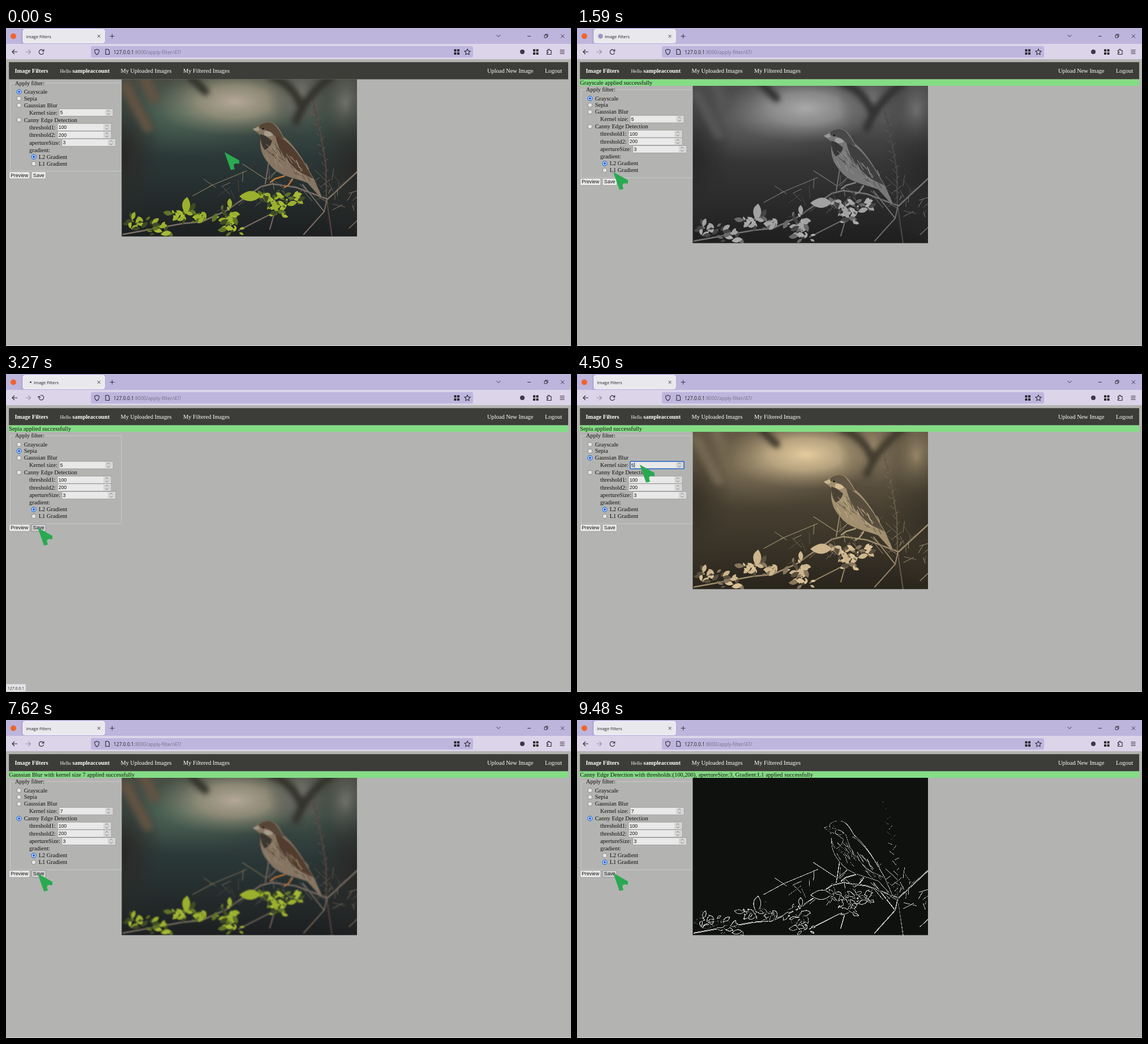
An HTML page for the animation above (9.75 s loop, 998x561 px).

```html
<!DOCTYPE html>
<html lang="en">
<head>
<meta charset="utf-8">
<title>Image Filters</title>
<style>
html, body { margin: 0; width: 100%; height: 100%; overflow: hidden; background: #b3b4b1 }
svg { display: block; width: 100vw; height: 100vh }
text { font: 10.4px "Liberation Serif", "Times New Roman", serif; fill: #111 }
.nav text { fill: #fff }
.bold { font-weight: bold }
.small { font-size: 8.65px }
.ui { font: 7.4px "Open Sans", sans-serif; fill: #222 }
.url { font-size: 8.5px }
.tiny { font-size: 6.9px }
.field { font: 8.7px "Liberation Sans", Arial, sans-serif }
.icons { fill: none; stroke: #2b2a33; stroke-width: 1.1; stroke-linejoin: round }
.box { fill: #e8e9e8; stroke: #8d8e8c; stroke-width: .7 }
.box.hover { fill: #cfcfd1; stroke: #77777c }
.box.focus { stroke: #2462c9; stroke-width: 1.6 }
.spin { fill: none; stroke: #666; stroke-width: .8 }
.radio circle:first-child { fill: #e6e6e6; stroke: #77777c; stroke-width: .8 }
.radio circle:last-child { fill: none }
.radio.on circle:first-child { fill: #fff; stroke: #1a62d6; stroke-width: 1.2 }
.radio.on circle:last-child { fill: #1a62d6 }
.twig { fill: none; stroke-linecap: round; stroke-linejoin: round }
</style>
</head>
<body>
<svg viewBox="0 0 998 561" preserveAspectRatio="none">
  <defs>
    <linearGradient id="dusk" x2="0" y2="1">
      <stop stop-color="#4a4a40"/><stop offset=".25" stop-color="#404f47"/>
      <stop offset=".5" stop-color="#2b3838"/><stop offset="1" stop-color="#1c1d1e"/>
    </linearGradient>
    <radialGradient id="glow"><stop stop-color="#b5a898"/><stop offset=".45" stop-color="#98917d" stop-opacity=".85"/><stop offset="1" stop-color="#68705c" stop-opacity="0"/></radialGradient>
    <radialGradient id="moss"><stop stop-color="#5c7764" stop-opacity=".8"/><stop offset="1" stop-color="#40574d" stop-opacity="0"/></radialGradient>
    <radialGradient id="shade"><stop stop-color="#282724"/><stop offset="1" stop-color="#2d2d2a" stop-opacity="0"/></radialGradient>
    <radialGradient id="haze"><stop stop-color="#74746c"/><stop offset="1" stop-color="#50524d" stop-opacity="0"/></radialGradient>
    <filter id="soft" x="-50%" y="-50%" width="200%" height="200%"><feGaussianBlur stdDeviation="5"/></filter>
    <filter id="edge" filterUnits="userSpaceOnUse" x="200" y="86" width="424" height="286" color-interpolation-filters="sRGB">
      <feColorMatrix type="saturate" values="0"/>
      <feConvolveMatrix order="3" kernelMatrix="-1 -1 -1 -1 8 -1 -1 -1 -1" preserveAlpha="true"/>
      <feComponentTransfer>
        <feFuncR type="table" tableValues=".06 .06 .8 .8 .8"/>
        <feFuncG type="table" tableValues=".07 .07 .8 .8 .8"/>
        <feFuncB type="table" tableValues=".06 .06 .8 .8 .8"/>
      </feComponentTransfer>
    </filter>
    <clipPath id="frame"><path d="M204.4 90.4H620V367.7H204.4z"/></clipPath>
    <path id="tiles" fill="#222" d="M0 0h4v4h-4zM5.5 0h4v4h-4zM0 5.5h4v4h-4zM5.5 5.5h4v4h-4z"/>
  </defs>

  <path fill="#bdb5dc" d="M0 0H998V28H0z"/>
  <path fill="#dcd4e9" d="M0 28H998V55H0z"/>
  <path stroke="#aaa3c6" d="M27.5 0V28"/>
  <circle cx="13" cy="14.5" r="5" fill="#f0642c"/>
  <rect x="30.5" y="2.5" width="143.5" height="23.5" rx="3" fill="#e9e8ec" stroke="#fff"/>
  <rect x="150" y="32" width="675" height="20" rx="3" fill="#beb6dd"/>
  <circle id="dot" cy="14.5" r="1.4" fill="#38383d"/>
  <circle id="burst" cx="41.5" cy="14.5" r="4.3" fill="#9b95c1"/>
  <text id="title" class="ui" y="17.5"></text>
  <g class="icons">
    <path stroke-width=".9" d="M161.5 12l5 5m0-5l-5 5M183.5 14.5h8m-4-4v8M866.5 12l3.5 3.5 3.5-3.5M921 14.5h6M980 11.5l6 6m0-6l-6 6M951 12.5h4.5v4.5h-4.5zm1.5 0v-1.500h4.500v4.500h-1.500"/>
    <path d="M20 42h-9m4-4l-4 4 4 4"/>
    <path stroke="#9a93ab" d="M34.5 42h9m-4-4l4 4-4 4"/>
    <path id="reload" d="M66 40A4.2 4.2 0 1 0 66.5 43.5m.3-6v3.5h-3.5"/>
    <path d="M160.5 37.5l4 1.500c0 4-1 6.500-4 8c-3-1.500-4-4-4-8zM176 37.5h4l2.500 2.500v6.500h-6.500z"/>
    <path d="M815 37l1.500 3.400 3.700.4-2.800 2.500.8 3.700-3.200-1.900-3.200 1.900.8-3.700-2.800-2.500 3.700-.4z"/>
    <path d="M955.5 39.5h2v-2h2.500v2h3v7h-7.500v-2.500h2v-2h-2zM978.5 39h8m-8 3h8m-8 3h8"/>
  </g>
  <use href="#tiles" x="791.5" y="37.5"/>
  <use href="#tiles" x="931" y="37.500"/>
  <circle cx="912" cy="42" r="4" fill="#3b3945"/>
  <text class="ui url" x="190" y="45.5">127.0.0.1<tspan fill="#77718c">:8000/apply-filter/47/</tspan></text>

  <path fill="#b3b4b1" d="M0 55H998V561H0z"/>
  <path fill="#d4d4d3" d="M0 560H998V561H0z"/>
  <path fill="#3c3c39" d="M5.2 60.2H993V90.4H5.2z"/>
  <g class="nav">
    <text class="bold" x="15.5" y="79">Image Filters</text>
    <text class="small" x="95.6" y="79">Hello</text>
    <text class="bold" x="117.3" y="79">sampleaccount</text>
    <text x="202.5" y="79">My Uploaded Images</text>
    <text x="313" y="79">My Filtered Images</text>
    <text x="850" y="79">Upload New Image</text>
    <text x="952" y="79">Logout</text>
  </g>
  <g id="note">
    <path fill="#84dc84" d="M5.2 90.4H993V102.1H5.2z"/>
    <text id="message" x="5.2" y="100.3"></text>
  </g>
  <g id="page">
    <path fill="none" stroke="#c9cac8" d="M15 97H7.5V252.5H204V97H70"/>
    <text x="16" y="100.5">Apply filter:</text>
    <g id="form"></g>
    <g id="photo" clip-path="url(#frame)"><g id="scene">
      <path fill="url(#dusk)" d="M190 80H634V378H190z"/>
      <ellipse cx="330" cy="150" rx="170" ry="75" fill="url(#moss)"/>
      <ellipse cx="404" cy="130" rx="145" ry="62" fill="url(#glow)"/>
      <ellipse cx="520" cy="115" rx="60" ry="75" fill="url(#haze)"/>
      <ellipse cx="600" cy="135" rx="40" ry="70" fill="url(#haze)"/>
      <ellipse cx="622" cy="250" rx="85" ry="130" fill="url(#shade)"/>
      <ellipse cx="205" cy="220" rx="70" ry="130" fill="url(#shade)"/>
      <g class="twig" filter="url(#soft)">
        <path stroke="#625342" stroke-width="18" d="M212 105L250 175M245 90L262 125"/>
        <path stroke="#30302b" stroke-width="14" d="M325 85L352 112M468 85Q505 98 520 135M575 85Q530 120 512 165"/>
      </g>
      <g id="plants"></g>
      <path fill="#857562" d="M436 179C446 174 449 166 462 166C478 166 484 180 490 191C506 204 520 224 530 242L544 266L558 298L552 295L532 273C505 263 480 261 465 240C450 225 447 205 450 192C447 185 441 183 436 179z"/>
      <path fill="#574636" d="M446 174C452 165 470 163 477 174C484 182 486 188 492 195L478 193C470 186 465 180 446 177z"/>
      <path fill="#a89c8a" d="M456 183Q464 179 472 188Q466 194 456 190z"/>
      <path fill="#3b362f" d="M449 187L458 190L470 199Q467 211 457 215Q449 205 449 187z"/>
      <path fill="#513c2e" d="M476 191C494 193 514 218 527 240L543 266L520 255C499 240 481 216 476 191z"/>
      <g id="plumage"></g>
      <path fill="#a09684" d="M436 178L447 174L448 181L441 182z"/>
      <circle cx="454" cy="178" r="1.7" fill="#171513"/>
      <path class="twig" stroke="#c27634" stroke-width="2.5" d="M492 261L475 266L467 272M506 267L498 278L492 281"/>
    </g></g>
  </g>
  <g id="status">
    <path fill="#e4e3e7" stroke="#bbb" stroke-width=".7" d="M0 547H35V560H0z"/>
    <text class="ui tiny" x="2.8" y="557">127.0.0.1</text>
  </g>
  <path id="cursor" fill="#2aa952" d="M0 0L26 14.5V20.5L19 20L16.5 22V25L18 30L11 31.5z"/>
</svg>
<script>
const $ = id => document.getElementById(id);
const LOOP = 9750, NOTE_HEIGHT = 11.7;

// Form
const label = (x, y, text) => `<text x="${x}" y="${y + 3.5}">${text}</text>`;
const radio = (id, x, y, text) => `<g id="${id}" class="radio"><circle cx="${x}" cy="${y}" r="3.9"/>
  <circle cx="${x}" cy="${y}" r="2.2"/></g>` + label(x + 8.7, y, text);
const number = (id, x, y, text, value) => label(41, y, text) +
  `<rect id="${id}Box" class="box" x="${x}" y="${y - 6.5}" width="95" height="13" rx="1"/>
  <path fill="#d5d6d5" d="M${x + 81} ${y - 5.5}h13v11h-13z"/>
  <path class="spin" d="M${x + 84.5} ${y - 1.5}l2.5-2.5 2.5 2.5m0 3l-2.5 2.5-2.5-2.5"/>
  <text id="${id}" class="field" x="${x + 1.7}" y="${y + 3.2}">${value}</text>`;
const button = (id, x, w, text) => `<rect id="${id}" class="box" x="${x}" y="253.5" width="${w}" height="12.5" rx="2"/>
  <text class="field" x="${x + w / 2}" y="262.8" text-anchor="middle">${text}</text>`;

$('form').innerHTML =
  radio('mode0', 23, 112.5, 'Grayscale') + radio('mode1', 23, 124.3, 'Sepia') +
  radio('mode2', 23, 136.3, 'Gaussian Blur') + number('kernel', 94, 149, 'Kernel size:', 5) +
  radio('mode3', 23, 162, 'Canny Edge Detection') + number('low', 91, 175, 'threshold1:', 100) +
  number('high', 91, 188.5, 'threshold2:', 200) + number('aperture', 98.7, 202.2, 'apertureSize:', 3) +
  label(41, 215.3, 'gradient:') + radio('grad0', 49, 227.3, 'L2 Gradient') +
  radio('grad1', 49, 239.3, 'L1 Gradient') +
  button('preview', 5.5, 36.5, 'Preview') + button('save', 45, 25.5, 'Save') +
  '<path id="caret" stroke="#111" stroke-width=".8" d="M101.6 144.5v9"/>';

// Branches, leaves and feathers
let seed = 11;
const rnd = () => (seed = seed * 16807 % 2147483647) / 2147483647;
const spread = r => (rnd() * 2 - 1) * r;
const repeat = (n, make) => Array.from({ length: n }, (_, i) => make(i)).join('');
const twig = (d, color, width) => `<path class="twig" d="${d}" stroke="${color}" stroke-width="${width}"/>`;
const leaf = (x, y, size, angle, color) => `<path fill="${color}" transform="translate(${x} ${y})rotate(${angle})"
  d="M0 0Q${size * .6} ${-size * .5} ${size} 0Q${size * .5} ${size * .45} 0 0"/>`;
const greens = ['#9bb02d', '#5f7428', '#a6ba35', '#3f4a26'];
const barks = ['#85786d', '#4f4740', '#6b5f56'];
const clumps = [[232, 345], [268, 354], [308, 332], [340, 334], [388, 328], [402, 352], [466, 302], [500, 306], [475, 325]];

const thorn = i => {
  const y = 136 + i * 9;
  return twig(`M${543 + i * 1.7} ${y}l${(i % 2 ? 1 : -1) * (4 + rnd() * 6)} ${-2 - rnd() * 7}`, '#6e5a52', 1);
};
const sprig = i => {
  const x = 370 + rnd() * 245, y = 305 - Math.sin((x - 380) / 75) * 22 + spread(28);
  return twig(`M${x} ${y}l${spread(22)} ${-5 - rnd() * 16}`, barks[i % 3], 1);
};
const foliage = i => {
  const [x, y] = clumps[i % clumps.length];
  return leaf(x + spread(15), y + spread(11), 6 + rnd() * 13, -90 + spread(150), greens[Math.floor(rnd() * 4)]);
};
const feather = i => {
  const u = rnd(), x = 455 + u * 72 + spread(9), y = 202 + u * 50 + spread(14);
  return twig(`M${x} ${y}l${3 + rnd() * 6} ${5 + rnd() * 7}`, i % 2 ? '#a99779' : '#4d4033', 1);
};

$('plants').innerHTML =
  twig('M542 132L552 165L565 240L566 300L576 368', '#57443f', 2.2) +
  twig('M207 364L312 345L345 342L388 323L450 280L470 275L512 281L568 302L620 254', '#7d7066', 2.6) +
  twig('M464 237L458 275M567 302L562 324L526 364M562 324L524 276M466 355L480 306M411 357L474 325', '#7a6c64', 2) +
  twig('M330 296L365 277M606 353L622 338M360 279L425 252M418 240L458 266', '#85775c', 1.2) +
  repeat(18, thorn) + repeat(60, sprig) + repeat(150, foliage) +
  leaf(317, 328, 30, -84, greens[0]) + leaf(412, 297, 38, 0, greens[0]);
$('plumage').innerHTML = repeat(48, feather);

// Each save: time of the click, wait for the new page, its message and filter
const canny = g => `Canny Edge Detection with thresholds:(100,200), apertureSize:3, Gradient:${g} applied successfully`;
const saves = [
  [1440, 90, 'Grayscale applied successfully', 'grayscale(1)'],
  [3060, 180, 'Sepia applied successfully', 'sepia(1)'],
  [6270, 210, 'Gaussian Blur with kernel size 7 applied successfully', 'blur(.9px)'],
  [7650, 120, canny('L2'), 'url(#edge)'],
  [8700, 360, canny('L1'), 'url(#edge)']
].map(([click, wait, message, filter]) => {
  const page = click + wait, image = page + 45;
  return { click, page, image, settled: image + 140, message, filter };
});

// Pointer moves: leave, arrive, place
const spots = {
  start: [386, 219], swing: [418, 142], sepia: [40, 134], branch: [484, 337], gauss: [30, 148],
  kernel: [111, 160], away: [506, 114], twigs: [585, 308], canny: [32, 173], l1: [50, 251],
  aboveSave: [64, 254], save: [56, 271], saveEdge: [64, 270]
};
const moves = [
  [450, 720, 'swing'], [720, 1350, 'aboveSave'], [1740, 2370, 'sepia'], [2520, 2970, 'save'],
  [3420, 3780, 'branch'], [3780, 4200, 'gauss'], [4290, 4380, 'kernel'], [4620, 5430, 'away'],
  [5610, 6210, 'save'], [6600, 6870, 'twigs'], [6870, 7200, 'canny'], [7290, 7530, 'save'],
  [7740, 8040, 'l1'], [8280, 8460, 'saveEdge']
];

const show = (id, on) => $(id).style.display = on ? '' : 'none';
const ease = k => (1 - Math.cos(Math.PI * Math.min(1, k))) / 2;

function cursorAt(t) {
  let [x, y] = spots.start;
  for (const [leave, arrive, name] of moves) {
    if (t < leave) break;
    const k = ease((t - leave) / (arrive - leave)), [toX, toY] = spots[name];
    x += (toX - x) * k;
    y += (toY - y) * k;
  }
  return [x, y];
}

function drawBrowser(t, save) {
  const loading = save && t < save.image, busy = save && t < save.settled;
  const age = loading ? t - save.click : 0;
  $('title').textContent = save && t < save.page ? '127.0.0.1:8000/apply-filter/47/' : 'Image Filters';
  $('title').setAttribute('x', busy ? 49 : 35.8);
  $('dot').setAttribute('cx', 41.5 - 4 * Math.cos(age / 100));
  $('reload').setAttribute('transform', `rotate(${age * 1.1} 62.3 42)`);
  show('dot', loading);
  show('burst', busy && !loading);
  show('status', loading);
}

function drawForm(t) {
  const mode = [2430, 4260, 7260].filter(at => at <= t).length;
  const grad = t < 8070 ? 0 : 1;
  const value = t < 4620 ? '5' : t < 5280 ? '' : '7';
  const focus = t >= 4470 && t < 6270;
  for (let i = 0; i < 4; i++) $('mode' + i).classList.toggle('on', i === mode);
  for (let i = 0; i < 2; i++) $('grad' + i).classList.toggle('on', i === grad);
  $('kernel').textContent = value;
  $('kernelBox').classList.toggle('focus', focus);
  show('caret', focus && (t - 4470) % 1000 < 500);
  $('caret').setAttribute('transform', `translate(${value ? 0 : -5} 0)`);
}

function draw(t) {
  const [x, y] = cursorAt(t);
  const shown = saves.filter(s => s.page <= t).pop();
  const shift = shown ? NOTE_HEIGHT : 0;
  drawBrowser(t, saves.filter(s => s.click <= t).pop());
  drawForm(t);

  show('note', shown);
  $('message').textContent = shown ? shown.message : '';
  $('page').setAttribute('transform', `translate(0 ${shift})`);
  show('photo', !shown || t >= shown.image);
  $('scene').style.filter = shown ? shown.filter : 'none';
  $('save').classList.toggle('hover', x > 45 && x < 70 && Math.abs(y - shift - 260) < 7);

  show('cursor', t < 4620 || t >= 5280);
  $('cursor').setAttribute('transform', `translate(${x} ${y})`);
}

function tick() {
  draw(performance.now() % LOOP);
  requestAnimationFrame(tick);
}
tick();
</script>
</body>
</html>
```
